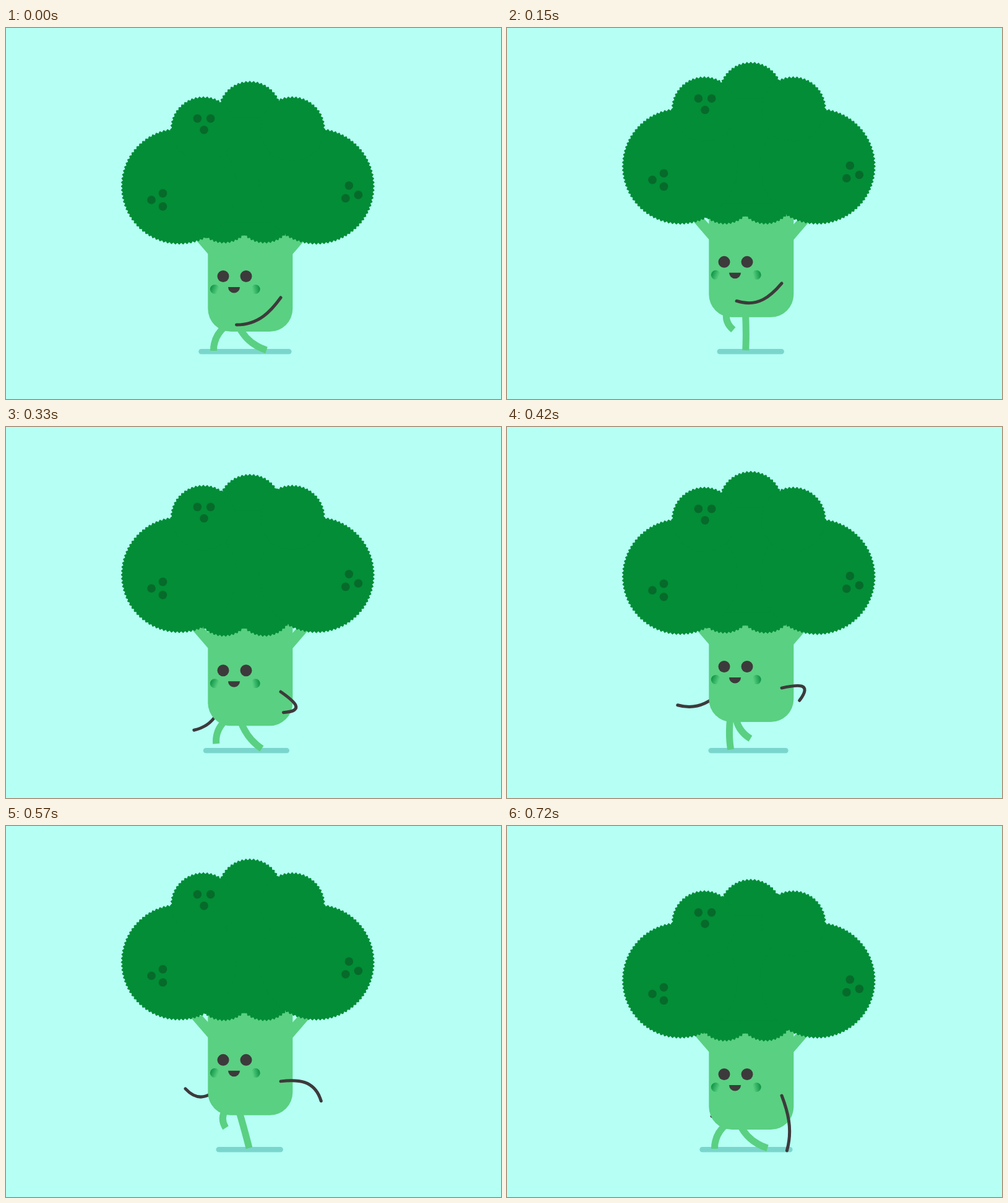
These frames come from a looping animation (800x600 px, 0.75 s). An HTML page:

```html
<!DOCTYPE html>
<html lang="en">
<head>
<meta charset="utf-8">
<title>Walking broccoli</title>
<style>
  html, body { margin: 0; width: 100%; height: 100%; overflow: hidden; background: #b5fff5; }
  svg { display: block; width: 100%; height: 100%; }
  .leg { fill: none; stroke: #5ad082; stroke-width: 11; }
  .arm { fill: none; stroke: #3d3a3b; stroke-width: 5; stroke-linecap: round; }
  .leaf { fill: #028d36; stroke: #028d36; stroke-linejoin: round; }
</style>
</head>
<body>
<svg viewBox="0 0 800 600">
  <defs>
    <linearGradient id="blushL" x1="0" y1=".3" x2="1" y2=".7">
      <stop offset=".05" stop-color="#109447"/>
      <stop offset=".85" stop-color="#5ad082"/>
    </linearGradient>
    <linearGradient id="blushR" x1="1" y1=".4" x2="0" y2=".6">
      <stop offset=".05" stop-color="#109447"/>
      <stop offset=".85" stop-color="#5ad082"/>
    </linearGradient>
  </defs>
  <rect width="800" height="600" fill="#b5fff5"/>
  <rect id="shadow" y="519" height="8.6" rx="4.3" fill="#7ad6cc"/>
  <path id="farArm" class="arm"/>
  <path id="legA" class="leg"/>
  <path id="legB" class="leg"/>
  <g id="body">
    <path fill="#5ad082" d="M326.300 300H463.300V454a37 37 0 0 1-37 37H363.300a37 37 0 0 1-37-37Z"/>
    <path fill="#5ad082" d="M327 366L296 330H317L327 341ZM463 366L494 330H473L463 341Z"/>
    <g fill="#3d3a3b">
      <circle cx="351" cy="401.500" r="9.500"/>
      <circle cx="388" cy="401.500" r="9.500"/>
      <path d="M359 419H378a9.500 9.500 0 0 1-19 0Z"/>
    </g>
    <circle cx="337.300" cy="422.500" r="7.500" fill="url(#blushL)"/>
    <circle cx="403.200" cy="422.500" r="7.500" fill="url(#blushR)"/>
  </g>
  <path id="nearArm" class="arm"/>
  <g id="mid" class="leaf"></g>
  <g id="outer" class="leaf"></g>
</svg>
<script>
const { PI, sin, cos, abs, min } = Math;
const $ = id => document.getElementById(id);
const FRAME = 30, LOOP = 750, STEP = 360;

function add(id, tag, attrs) {
  const el = document.createElementNS('http://www.w3.org/2000/svg', tag);
  for (const k in attrs) el.setAttribute(k, attrs[k]);
  $(id).append(el);
}

// Disc with a toothed rim
function lobe(id, cx, cy, r) {
  const teeth = Math.round(2 * PI * r / 6.4);
  const points = Array.from({ length: teeth * 2 }, (_, i) => {
    const a = PI * i / teeth - PI / 2;
    const q = i % 2 ? r - 2.4 : r + 0.5;
    return `${cx + q * cos(a)},${cy + q * sin(a)}`;
  }).join(' ');
  add(id, 'polygon', { points });
}

// Three spots around a centre
function spots(cx, cy, deg) {
  for (let i = 0; i < 3; i++) {
    const a = (deg + 120 * i) * PI / 180;
    add('outer', 'circle', {
      cx: cx + 12.3 * cos(a), cy: cy + 12.3 * sin(a), r: 6.8, fill: '#066a2a', stroke: 'none'
    });
  }
}

lobe('mid', 394, 138, 51.3);
lobe('mid', 352, 302, 46.3);
lobe('mid', 418, 302, 46.3);
add('mid', 'rect', { x: 325, y: 145, width: 130, height: 170 });
lobe('outer', 280, 256, 93.5);
lobe('outer', 501.5, 256, 93.5);
lobe('outer', 319, 164, 52.7);
lobe('outer', 462.5, 164, 52.7);
spots(320, 152.5, 90);
spots(247.3, 278, 180);
spots(557.5, 266.7, 15);

const move = (id, y) => $(id).setAttribute('transform', `translate(0 ${y})`);
const hop = (u, power) => 1 - abs(1 - 2 * u) ** power;
const ease = u => (1 - cos(PI * min(1, u))) / 2;

// Swing between -1 (at lo) and 1 (at hi); slow before lo, gentle after hi
function swing(t, lo, hi) {
  if (t < hi) return -cos(PI * (t - lo) / (t < lo ? 860 : hi - lo));
  return cos(PI * (t - hi) / 430);
}

// Two limbs joined by a soft elbow; angles in degrees from straight down
function drawArm(id, x, y, upper, fore) {
  const along = (deg, len) => [len * sin(deg * PI / 180), len * cos(deg * PI / 180)];
  const [ux, uy] = along(upper, 54), [fx, fy] = along(fore, 40);
  const hx = x + ux + fx, hy = y + uy + fy;
  $(id).setAttribute('d', `M${x} ${y}C${x + ux * 0.5} ${y + uy * 0.5} ` +
    `${hx - fx * 0.9} ${hy - fy * 0.9} ${hx} ${hy}`);
}

// The foot slides back on the ground for one step, then lifts forward
function drawLeg(id, t, dy, lean) {
  const down = t < STEP, u = t % STEP / STEP, arc = sin(PI * u);
  let hip, x, y, bow;
  if (down) {
    hip = 355 + 21 * ease(2.2 * u) + lean * arc;
    x = 335.5 + 85.5 * u + 11.5 * arc + 7 * sin(2 * PI * u);
    y = 522 - 2 * u;
    bow = 12 * arc - 10;
  } else {
    hip = 376 - 21 * ease(2.2 * u);
    x = 335.5 + 85.5 * (1 - u) ** 2.2 + 8 * sin(PI * u * u);
    y = 521 - 34 * arc;
    bow = -9.5;
  }
  const top = 482 + dy;
  $(id).setAttribute('d', `M${hip} ${top}Q${(hip + x) / 2 + bow} ` +
    `${(top + y) / 2 + 0.2 * (x - hip)} ${x} ${y}`);
}

function draw(t) {
  const u = t % STEP / STEP;
  const dy = -23.6 * hop(u, 2.2);
  for (const id of ['body', 'nearArm', 'farArm']) move(id, dy);

  // The crown trails the body, its outer lobes most
  const lag = t < 60 ? 0 : 13 * abs(sin(PI * (t - 60) / STEP));
  move('outer', dy - lag);
  move('mid', dy - 10.3 * sin(PI * (t - 25) / STEP) ** 2);

  const squeeze = hop(u, 1.58);
  const left = 311.3 + 30 * squeeze;
  $('shadow').setAttribute('x', left);
  $('shadow').setAttribute('width', 461.5 - 14.5 * squeeze - left);

  drawLeg('legA', t % 720, dy, 10);
  drawLeg('legB', (t + STEP) % 720, dy, 0);

  const upper = swing(t, 120, 480), fore = swing(t, 230, 575);
  drawArm('nearArm', 444, 436, 35 + 78 * upper, -47 + 64 * fore);
  drawArm('farArm', 352, 436, 5 - 57 * upper, -100 - 37 * fore);
}

function tick() {
  const t = performance.now() % LOOP;
  draw(Math.floor(t / FRAME) * FRAME);
  requestAnimationFrame(tick);
}
tick();
</script>
</body>
</html>
```
